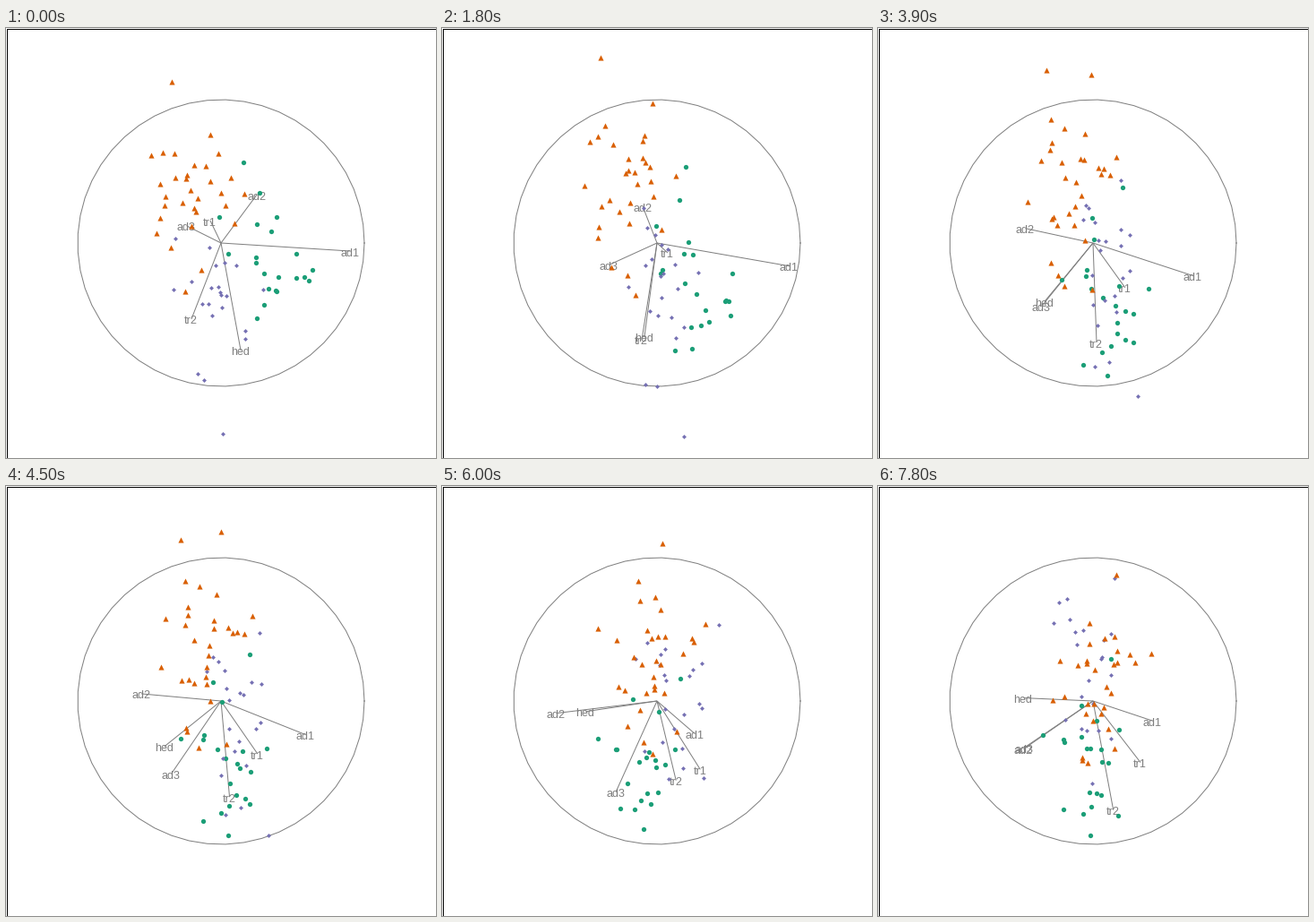
Recreate the animation shown at these times as a matplotlib script. Size 480x480 px, loop 8 s.

```python
import numpy as np
import matplotlib.pyplot as plt
from matplotlib.animation import FuncAnimation
from matplotlib.collections import LineCollection

SIZE, MID, RADIUS, UNIT = 480, 239.5, 160, 248
GRAY = "#7f7f7f"
LABELS = ["tr1", "tr2", "hed", "ad1", "ad2", "ad3"]

# The tour moves along a geodesic OPENING -> PASSING, runs on to TURN,
# then follows a second geodesic to CLOSING. Rows are axis tips in pixels.
PASS, TURN, END = 17, 20, 26
OPENING = [(-12, -25), (-33, 85), (22, 120), (144, 9), (40, -54), (-38, -19)]
PASSING = [(45, 67), (15, 102), (-71, 37), (75, 37), (-100, 2), (-52, 92)]
CLOSING = [(54, 68), (24, 122), (-78, -2), (67, 21), (-77, 55), (-77, 54)]

# Six measured variables: range and loading on a shared size factor.
RANGE = np.array([120, 36, 15, 41, 8, 61])
LOADING = np.array([0.7, 0.75, 0.75, 0.55, 0.1, 0.2])

# Each group is a normal cloud; an extreme case may lead it.
GROUPS = [
    dict(color="#1b9e77", marker="o", area=28, count=21, extreme=None,
         mean=[183, 129.6, 51.2, 146.2, 14.1, 104.9],
         spread=[12.1, 7.2, 2.2, 5.6, 0.9, 6.2]),
    dict(color="#7570b3", marker="D", area=12, count=22,
         extreme=[158, 141, 58, 145, 8, 107],
         mean=[138.2, 125.1, 51.6, 138.3, 10.1, 106.6],
         spread=[9.3, 8.5, 2.8, 4.2, 1, 5.9]),
    dict(color="#d95f02", marker="^", area=38, count=31,
         extreme=[184, 108, 43, 116, 16, 75],
         mean=[201, 119.3, 48.9, 124.6, 14.3, 81],
         spread=[14.9, 6.6, 2.3, 4.6, 1.1, 8.9]),
]
CENTER = np.average([g["mean"] for g in GROUPS], axis=0,
                    weights=[g["count"] for g in GROUPS])


def orthonormal(tips):
    u, _, vt = np.linalg.svd(np.array(tips, float), full_matrices=False)
    return u @ vt


def geodesic(start, end):
    """Rotate the start plane into the end plane at constant speed."""
    va, cosines, vzt = np.linalg.svd(start.T @ end)
    ga, gz = start @ va, end @ vzt.T
    angles = np.arccos(np.clip(cosines, -1, 1))
    across = gz - ga * cosines
    across /= np.linalg.norm(across, axis=0)
    return lambda t: (ga * np.cos(t * angles) + across * np.sin(t * angles)) @ va.T


first_leg = geodesic(orthonormal(OPENING), orthonormal(PASSING))
second_leg = geodesic(first_leg(TURN / PASS), orthonormal(CLOSING))


def basis(step):
    """Orthonormal 6x2 projection at a tour step."""
    if step <= TURN:
        return first_leg(step / PASS)
    return second_leg((step - TURN) / (END - TURN))


def scaled(values):
    return (np.asarray(values, float) - CENTER) / RANGE * UNIT


def cloud(group, rng):
    """Correlated six-dimensional points around the group mean."""
    corr = np.outer(LOADING, LOADING)
    np.fill_diagonal(corr, 1)
    normal = np.clip(rng.standard_normal((group["count"], 6)), -2, 2)
    normal -= normal.mean(axis=0)
    spread = np.array(group["spread"]) / RANGE * UNIT
    points = scaled(group["mean"]) + normal @ np.linalg.cholesky(corr).T * spread
    if group["extreme"]:
        points[0] = scaled(group["extreme"])
    return points


rng = np.random.default_rng(7)
clouds = [cloud(g, rng) for g in GROUPS]

fig = plt.figure(figsize=(SIZE / 72, SIZE / 72), dpi=72, facecolor="white")
ax = fig.add_axes([0, 0, 1, 1])
ax.set(xlim=(-0.5, SIZE - 0.5), ylim=(SIZE - 0.5, -0.5))
ax.axis("off")

last = SIZE - 1
ax.plot([0, last, last, 0, 0], [0, 0, last, last, 0], color="black", lw=1,
        snap=True, clip_on=False)
angle = np.linspace(0, 2 * np.pi, 50)
ax.plot(MID + RADIUS * np.cos(angle), MID - RADIUS * np.sin(angle),
        color=GRAY, lw=1)

spokes = LineCollection([], colors=GRAY, linewidths=1, zorder=2)
ax.add_collection(spokes)
texts = [ax.text(0, 0, name, color=GRAY, family="Liberation Sans", size=12.5,
                 ha="center", va="baseline", zorder=3) for name in LABELS]
dots = [ax.scatter([], [], s=g["area"], c=g["color"], marker=g["marker"],
                   linewidths=0, antialiaseds=False, zorder=4 + i)
        for i, g in enumerate(GROUPS)]


def update(frame):
    view = basis(frame // 3)
    tips = MID + RADIUS * view
    spokes.set_segments([[(MID, MID), tip] for tip in tips])
    for text, (x, y) in zip(texts, tips):
        text.set_position((x - 0.5, y + 5.5))
    for dot, points in zip(dots, clouds):
        dot.set_offsets(MID + points @ view)
    return [spokes, *texts, *dots]


anim = FuncAnimation(fig, update, frames=80, interval=100, repeat=True,
                     repeat_delay=0, blit=False)
plt.show()
```
